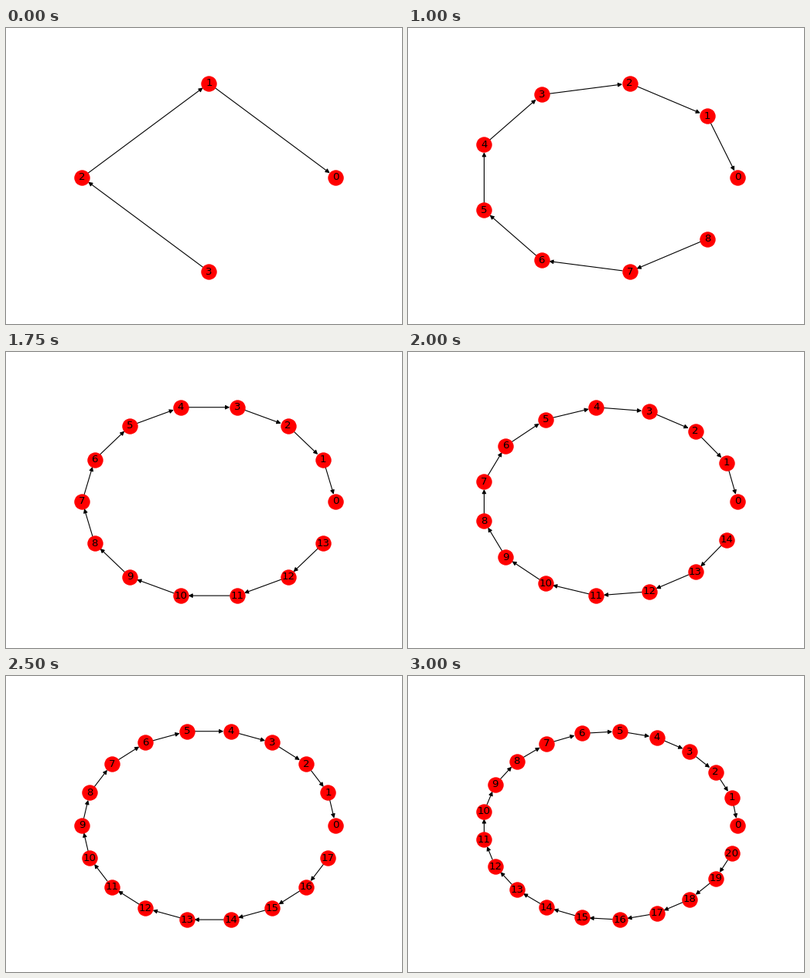
These frames come from a looping animation (512 by 384 pixels, 3250 ms). A matplotlib script:

```python
import matplotlib.pyplot as plt
import numpy as np
from matplotlib.animation import FuncAnimation
from matplotlib.patches import FancyArrowPatch

FRAMES = 13
INTERVAL = 250
NODE_SIZE = 300      # marker area in points squared
PAD = 0.105          # free space on each side, relative to the graph's extent

plt.rcParams["font.family"] = "DejaVu Sans"
fig = plt.figure(figsize=(6.4, 4.8), dpi=80, facecolor="white")
ax = fig.add_axes((0.125, 0.11, 0.775, 0.77))


def node_count(frame):
    """Nodes arrive alternately one and two at a time."""
    return max(4, (3 * frame + 7) // 2)


def circle_layout(n):
    angle = 2 * np.pi * np.arange(n) / n
    return np.column_stack([np.cos(angle), np.sin(angle)])


def fit_view(pos):
    low, high = pos.min(axis=0), pos.max(axis=0)
    pad = PAD * (high - low)
    ax.set_xlim(low[0] - pad[0], high[0] + pad[0])
    ax.set_ylim(low[1] - pad[1], high[1] + pad[1])


def draw_edge(start, end):
    gap = np.sqrt(NODE_SIZE) / 2
    ax.add_patch(FancyArrowPatch(
        start, end, arrowstyle="-|>", mutation_scale=10,
        shrinkA=gap, shrinkB=gap, color="black", linewidth=1, zorder=1))


def draw_graph(frame):
    ax.clear()
    ax.set_axis_off()
    pos = circle_layout(node_count(frame))
    fit_view(pos)
    for start, end in zip(pos[1:], pos[:-1]):
        draw_edge(start, end)
    ax.scatter(pos[:, 0], pos[:, 1], s=NODE_SIZE, c="red", zorder=2)
    for i, (x, y) in enumerate(pos):
        ax.text(x, y, str(i), fontsize=12, color="black",
                ha="center", va="center", zorder=3)
    return []


anim = FuncAnimation(fig, draw_graph, frames=FRAMES, interval=INTERVAL,
                     repeat=True, repeat_delay=0, blit=False)
plt.show()
```
